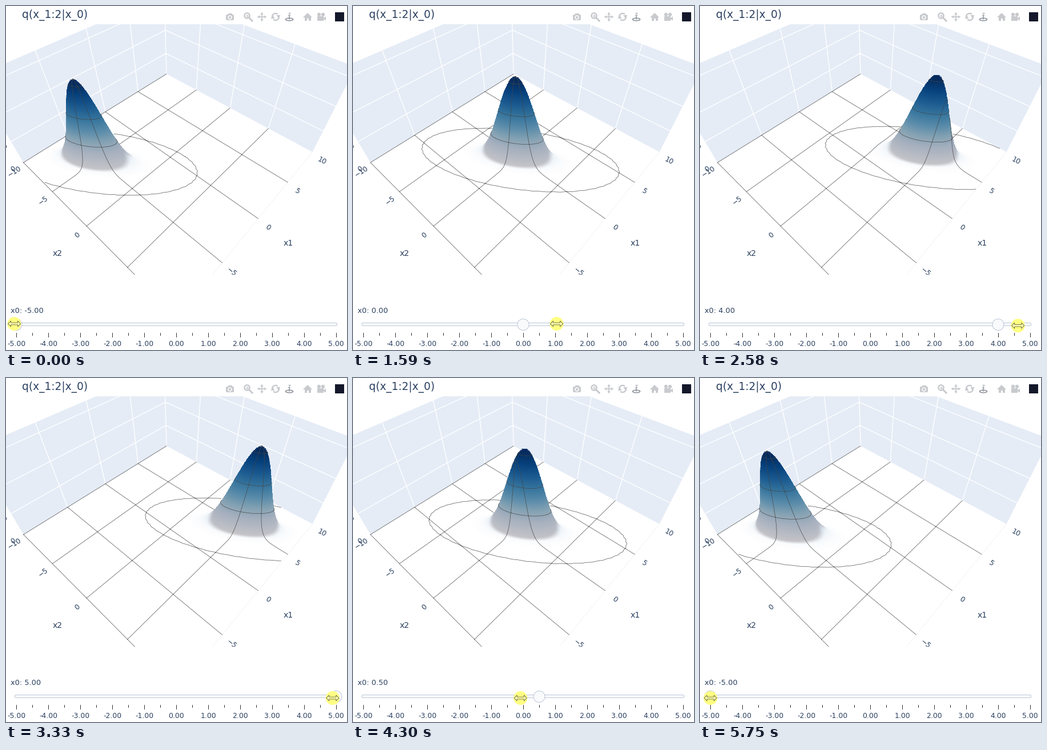
Animation, 597 px wide and 603 px high, one loop 5800 ms. Source, as a matplotlib script:

```python
import matplotlib.pyplot as plt
import numpy as np
from matplotlib.animation import FuncAnimation
from matplotlib.colors import LinearSegmentedColormap
from matplotlib.patches import (Arc, Circle, Ellipse, FancyBboxPatch, Polygon,
                                Rectangle, RegularPolygon)

W, H = 597, 603
LOOP, STEP = 5800, 40
PX = 0.72  # points per pixel at 100 dpi
INK, WALL, ICON = "#2a3f5f", "#e5ecf6", "#c8cace"

# Perspective matrix: rows give x, y and depth from (x1/10, x2/10, height, 1)
VIEW = np.array([
    [170.05, 87.45, -74.9, 287.6],
    [-56.6, 51.6, -182.2, 265.0],
    [0.1665, -0.1505, -0.2512, 1.0],
])
UNVIEW = np.linalg.inv(VIEW[:, :3])
EYE = -UNVIEW @ VIEW[:, 3]
PEAK, LEVEL, CEIL = 0.937, 0.2945, 0.975
SPREAD, FAR_RING = 0.985, 6.12

BLUES = LinearSegmentedColormap.from_list("hill", [
    "#f7fbff", "#deebf7", "#c6dbef", "#9ecae1", "#6baed6",
    "#4292c6", "#2171b5", "#08519c", "#08306b"])

fig = plt.figure(figsize=(W / 100, H / 100), dpi=100, facecolor="white")
ax = fig.add_axes([0, 0, 1, 1])
ax.set_xlim(0, W)
ax.set_ylim(H, 0)
ax.axis("off")


def project(u, v, t):
    x, y, w = (r[0] * u + r[1] * v + r[2] * t + r[3] for r in VIEW)
    return x / w, y / w


def offsets(u, v, m):
    return (10 * u - m) / SPREAD, (10 * v - m) / SPREAD


def height(u, v, m):
    a, b = offsets(u, v, m)
    return PEAK * np.exp(-0.5 * (2 * a * a - 2 * a * b + b * b))


def visible(u, v, t, m):
    s = np.linspace(0.01, 0.5, 60)[:, None]
    ru, rv, rt = (p + s * (e - p) for p, e in zip((u, v, t), EYE))
    return np.all(height(ru, rv, m) < rt + 0.006, axis=0)


def text(x, y, s, size=12, rot=0, ha="center", z=3, color=INK):
    return ax.text(x, y, s, fontsize=size * PX, rotation=rot, ha=ha,
                   va="center" if rot else "center_baseline",
                   color=color, family="DejaVu Sans", zorder=z)


def line(xs, ys, color, width=1.0, z=1, **kw):
    return ax.plot(xs, ys, color=color, lw=width * PX, zorder=z, **kw)[0]


def edge(p, q, color="white", width=1.4):
    line(*zip(project(*p), project(*q)), color, width)


def shape(patch, face=ICON, rim="none", width=0, z=7):
    patch.set(facecolor=face, edgecolor=rim, linewidth=width * PX, zorder=z)
    return ax.add_patch(patch)


def tick_label(value, p, q, dx, dy):
    """Label at grid point p, turned along the grid line from p to q."""
    (x0, y0), (x1, y1) = project(*p), project(*q)
    rot = -np.degrees(np.arctan((y1 - y0) / (x1 - x0)))
    text(x0 + dx, y0 + dy, f"{value:g}".replace("-", "\u2212"), 12.3, rot)


def draw_room():
    for a, b in (((-1, -1), (1, -1)), ((1, -1), (1, 1))):
        corners = [(*a, 0), (*b, 0), (*b, CEIL), (*a, CEIL)]
        shape(Polygon([project(*p) for p in corners]), WALL, z=0)
        for s in (0.25, 0.5, 0.75, 1):
            c = [p + s * (q - p) for p, q in zip(a, b)]
            if s < 1 or b == (1, -1):
                edge((*c, 0), (*c, CEIL))
        for k in (1, 2, 3):
            edge((*a, k * LEVEL), (*b, k * LEVEL))
    edge((1, 1, 0), (-1, 1, 0), "#f3f5f9", 1)

    for c in (-5, 0, 5, 10):
        tick_label(c, (c / 10, 1, 0), (c / 10, -1, 0), 16.5, 16)
    for c in (-10, -5, 0):
        tick_label(c, (-1, c / 10, 0), (1, c / 10, 0), -16, 15.5)
    for k in (0, 1):
        tick_label(0.05 * k, (-1, -1, k * LEVEL), (1, -1, k * LEVEL), -18, 12)
    text(494, 414.5, "x1", 14)
    text(90, 432.5, "x2", 14)
    shape(Rectangle((0, 0), W, 32), "white", z=5)
    shape(Rectangle((0, 471), W, H - 471), "white", z=5)


def cross(x, y, r, width):
    line([x - r, x + r], [y, y], ICON, width, 7)
    line([x, x], [y - r, y + r], ICON, width, 7)


def draw_icons():
    y = 19
    shape(FancyBboxPatch((385, 15), 14, 10, boxstyle="round,pad=0,rounding_size=2"))
    shape(Rectangle((388.5, 12.5), 7, 4))
    shape(Circle((392, 20), 3), ICON, "white", 1.5)

    shape(Circle((422, 17), 4.6), "none", ICON, 2.4)
    line([425.5, 431], [20.5, 26], ICON, 3, 7)
    cross(422, 17, 2.3, 1.3)

    cross(448, y, 6, 1.8)
    for i in range(4):
        a = i * np.pi / 2
        shape(RegularPolygon((448 + 5.5 * np.sin(a), y + 5.5 * np.cos(a)), 3,
                             radius=3, orientation=-a))

    for a in (0, 180):
        ax.add_patch(Arc((472, y), 12, 12, angle=a, theta1=0, theta2=130,
                         color=ICON, lw=2.4 * PX, zorder=7))
        d = np.cos(np.radians(a))
        shape(RegularPolygon((472 + 5 * d, y - d), 3, radius=4,
                             orientation=np.radians(a)))

    dark = "#8f949d"
    text(496, 13.5, "z", 9, z=7, color=dark)
    line([496, 496], [17, 23], dark, 1.5, 7)
    shape(Ellipse((496, 23.5), 13, 4.5), "none", dark, 1.6)

    shape(Polygon([(520, 20), (528, 12), (536, 20)]))
    shape(Rectangle((522.5, 20), 11, 6))
    shape(Rectangle((526.5, 21.5), 3, 4.5), "white")

    for x in (548, 555):
        shape(Circle((x, 15), 3.2))
    shape(Rectangle((545, 18), 11, 8))
    shape(RegularPolygon((558, 22), 3, radius=4, orientation=np.pi / 2))

    shape(Rectangle((576, 11), 16, 16), "#14182a")


def draw_slider():
    shape(FancyBboxPatch((15.5, 555.5), 564, 5,
                         boxstyle="round,pad=0,rounding_size=2"),
          "#f8fafc", "#bec8d9", 1)
    for i in range(21):
        x = 17.5 + 28 * i
        line([x, x], [573, 577 if i % 2 else 580], "#333333", 1, 7)
        if i % 2 == 0:
            text(18 + 28 * i, 591.5, f"{i / 2 - 5:.2f}", 12.4, z=7)


def hill_image(m):
    """Cast one ray per pixel onto the bell and shade the first hit."""
    cx = int(project(m / 10, m / 10, 0)[0])
    x0, x1, y0, y1 = cx - 100, cx + 100, 110, 320
    px, py = np.meshgrid(np.arange(x0, x1) + 0.5, np.arange(y0, y1) + 0.5)
    ray = np.tensordot(UNVIEW, np.array([px, py, np.ones_like(px)]), 1)

    def at(t):
        w = (t - EYE[2]) / ray[2]
        return EYE[0] + w * ray[0], EYE[1] + w * ray[1]

    levels = np.linspace(PEAK, 0, 80)
    gap = np.array([height(*at(t), m) - t for t in levels])
    hit = np.maximum(np.argmax(gap >= 0, axis=0), 1)
    after = np.take_along_axis(gap, hit[None], 0)[0]
    before = np.take_along_axis(gap, hit[None] - 1, 0)[0]
    part = np.clip(after / (after - before + 1e-12), 0, 1)
    t = levels[hit] + part * (levels[0] - levels[1])

    u, v = at(t)
    f = height(u, v, m) / PEAK
    a, b = offsets(u, v, m)
    slope = f * np.hypot(2 * a - b, b - a)
    k = np.clip((slope - 0.11) / 0.12, 0, 1)
    k = (k * k * (3 - 2 * k))[..., None]
    rgba = BLUES(f)
    lit = np.array([1.033, 1.016, 1.0])
    dim = np.array([0.83, 0.80, 0.795])
    rgba[..., :3] = np.clip(rgba[..., :3] * (lit + k * (dim - lit)), 0, 1)
    rgba[..., 3] = np.clip(f / 0.01, 0, 1)
    return ax.imshow(rgba, extent=(x0, x1, y1, y0), aspect="auto",
                     interpolation="nearest", zorder=2, visible=False)


def hill_lines(m):
    span = np.linspace(-1, 1, 260)
    paths = []
    for c in (-1, -0.5, 0, 0.5):
        fixed = np.full_like(span, c)
        for u, v in ((fixed, span), (span, fixed)):
            paths.append((u, v, height(u, v, m)))
    th = np.linspace(0, 2 * np.pi, 260)
    rings = [(np.sqrt(2 * np.log(PEAK / (k * LEVEL))), k * LEVEL) for k in (1, 2, 3)]
    rings.append((FAR_RING * (1 + 0.004 * np.sin(47 * th)), 0.0))
    for r, t in rings:
        a, b = SPREAD * r * np.cos(th), SPREAD * r * np.sin(th)
        paths.append(((m + a) / 10, (m + a + b) / 10, np.full_like(th, t)))
    xs, ys = [], []
    for u, v, t in paths:
        x, y = project(u, v, t)
        inside = (abs(u) <= 1) & (abs(v) <= 1)
        xs += [np.where(inside & visible(u, v, t, m), x, np.nan), [np.nan]]
        ys += [y, [np.nan]]
    return line(np.concatenate(xs), np.concatenate(ys), "#444444", 0.65, 4,
                visible=False)


draw_room()
draw_icons()
draw_slider()
text(28, 13.3, "q(x_1:2|x_0)", 18.6, ha="left", z=7)
readout = text(8, 532.5, "", 12.9, ha="left", z=7)
hills = [(hill_image(i / 2 - 5), hill_lines(i / 2 - 5)) for i in range(21)]

handle = shape(Circle((18, 558), 10), "#f8fafc", "#bec8d9", 1, z=8)
spot = shape(Circle((15, 557), 12), (1, 1, 0.48, 0.93), z=9)
HEAD = np.array([(-6, 1.8), (-6, 5), (-11, 0), (-6, -5), (-6, -1.8)])
ARROW = np.vstack([HEAD, -HEAD])
arrow = shape(Polygon(ARROW), "#ffffb4", "#58582f", 0.8, z=10)

# Key points as (ms, value): the plot trails the mouse
VALUE = ((313, -5), (2850, 5), (3400, 5), (3740, 4), (3880, 2.5), (5470, -5))
MOUSE = ((280, 14.5), (1590, 358), (2580, 561), (2860, 579),
         (3300, 579), (3740, 450), (4870, 133), (5750, 10))


def track(t, keys):
    return np.interp(t, *zip(*keys))


def update(i):
    t = STEP * (i + 0.5)
    t = 262 + 69.6 * np.floor((t - 262) / 69.6 + 0.15)  # screen refresh
    n = int(round(2 * (track(t, VALUE) + 5)))
    for j, pair in enumerate(hills):
        for artist in pair:
            artist.set_visible(j == n)
    readout.set_text(f"x0: {n / 2 - 5:.2f}")
    handle.center = (18 + 28 * n, 558.5)
    mouse = (track(t, MOUSE), 557 + 4 * np.clip((t - 1590) / 1200, 0, 1))
    spot.center = mouse
    arrow.set_xy(ARROW + mouse)
    return []


anim = FuncAnimation(fig, update, frames=LOOP // STEP, interval=STEP,
                     repeat=True, repeat_delay=0, blit=False)
plt.show()
```
